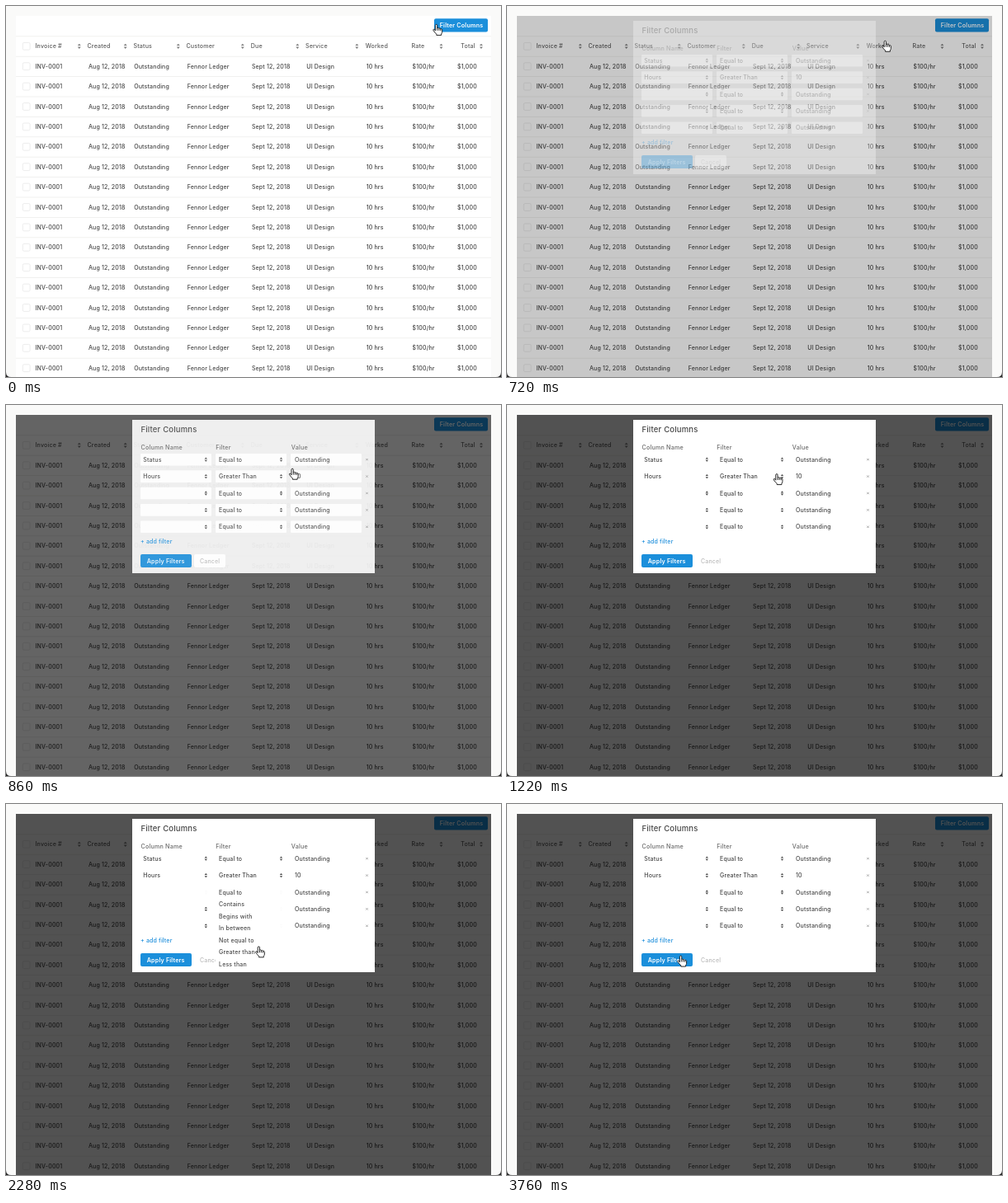
Write an HTML page that moves like this. It is 600 by 450 pixels and loops after 4.14 s.

```html
<!DOCTYPE html>
<html lang="en">
<head>
<meta charset="utf-8">
<title>Filter columns</title>
<style>
  html, body { margin: 0; width: 100%; height: 100%; overflow: hidden; background: #222; }
  svg { display: block; width: 100vw; height: 100vh; }
  text { font: 500 7px Inter, "Open Sans", sans-serif; letter-spacing: .17px; fill: #444; white-space: pre; }
  .head { font-size: 7.1px; fill: #5c5c5c; }
  .title { font-size: 9.5px; }
  .label { font-size: 7.2px; fill: #6a6a6a; }
  .button { font-size: 7.2px; font-weight: 600; fill: #fff; }
  .link { fill: #1b8ddb; }
  .muted { fill: #b9b9b9; }
</style>
</head>
<body>
<svg id="stage" viewBox="0 0 600 450"></svg>
<script>
const LOOP = 4140;
const BLUE = '#1b8fdb';
const stage = document.getElementById('stage');

function add(parent, tag, attrs = {}, content = '') {
  const node = document.createElementNS('http://www.w3.org/2000/svg', tag);
  for (const key in attrs) node.setAttribute(key, attrs[key]);
  node.textContent = content;
  parent.appendChild(node);
  return node;
}
const box = (parent, x, y, width, height, fill, extra = {}) =>
  add(parent, 'rect', { x, y, width, height, fill, ...extra });
// y is the vertical middle of the line
const label = (parent, x, y, content, cls = '') =>
  add(parent, 'text', { x, y: y + (cls === 'title' ? 3.4 : 2.6), class: cls }, content);
const arrows = (parent, x, y, fill, size = 1) =>
  add(parent, 'path', {
    d: 'M-2-.7L0-3.1 2-.7zM-2 .7L0 3.1 2 .7z', fill,
    transform: `translate(${x} ${y}) scale(${size})`
  });

// Table
const columns = [
  // title, title x, cell, cell x, sort arrow x
  ['Invoice #', 35.5, 'INV-0001', 35.5, 88.8],
  ['Created', 98.5, 'Aug 12, 2018', 99.9, 144.7],
  ['Status', 154.5, 'Outstanding', 155.2, 208.8],
  ['Customer', 218.5, 'Fennor Ledger', 219.7, 286.8],
  ['Due', 296.7, 'Sept 12, 2018', 297.9, 353.3],
  ['Service', 363, 'UI Design', 364.3, 425.3],
  ['Worked', 435.7, '10 hrs', 436.7],
  ['Rate', 491.5, '$100/hr', 492.5, 527.5],
  ['Total', 551.3, '$1,000', 547, 576]
];

function drawTable() {
  add(stage, 'path', { d: 'M0 0H600V444Q600 450 594 450H6Q0 450 0 444z', fill: '#fafaf9' });
  box(stage, 12, 12, 576, 438, '#fff');
  box(stage, 519, 15.2, 65, 16.2, BLUE, { rx: 2 });
  label(stage, 525.7, 23.4, 'Filter Columns', 'button');
  for (let row = 0; row <= 16; row++) {
    const y = 48.8 + row * 24.4;
    box(stage, 12, y - 12.4, 576, .8, '#ededec');
    box(stage, 20.3, y - 4.4, 8.8, 8.8, '#fff', { rx: 1.5, stroke: '#e8e8e7', 'stroke-width': .8 });
    for (const [title, titleX, cell, cellX, sortX] of columns) {
      if (row) {
        label(stage, cellX, y, cell);
        continue;
      }
      label(stage, titleX, y, title, 'head');
      if (sortX) arrows(stage, sortX, y, '#808080');
    }
  }
}

// Filter dialog
const filters = [
  ['Status', 'Equal to', 'Outstanding'],
  ['Hours', 'Greater Than', '10'],
  ['', 'Equal to', 'Outstanding'],
  ['', 'Equal to', 'Outstanding'],
  ['', 'Equal to', 'Outstanding']
];
const options = ['Equal to', 'Contains', 'Begins with', 'In between', 'Not equal to', 'Greater than', 'Less than'];
let coveredArrow;

function drawDialog(dialog) {
  box(dialog, 153, 18, 294, 186, '#fff');
  label(dialog, 163.5, 29.3, 'Filter Columns', 'title');
  label(dialog, 163.5, 51, 'Column Name', 'label');
  label(dialog, 254.3, 51, 'Filter', 'label');
  label(dialog, 345.8, 51, 'Value', 'label');
  filters.forEach(([column, test, value], i) => {
    const y = 66.2 + i * 20.4;
    for (const x of [163, 254, 345]) box(dialog, x, y - 7.3, 86, 14.6, '#fff', { rx: 1 });
    label(dialog, 166.3, y, column);
    label(dialog, 258, y, test);
    label(dialog, 350, y, value);
    const arrow = arrows(dialog, 242.3, y, '#444', .85);
    if (i === 2) coveredArrow = arrow;
    arrows(dialog, 333.5, y, '#444', .85);
    add(dialog, 'path', {
      d: `M436.3 ${y - 1.2}l2.4 2.4m0-2.4l-2.4 2.4`, stroke: '#888', 'stroke-width': .7
    });
  });
  label(dialog, 163, 165.6, '+ add filter', 'link');
  box(dialog, 163, 181, 62, 16, BLUE, { rx: 2 });
  label(dialog, 170.7, 189, 'Apply Filters', 'button');
  box(dialog, 228, 181, 38, 16, '#fff', { rx: 2 });
  label(dialog, 235, 189, 'Cancel', 'muted');
}

function drawMenu(menu) {
  box(menu, 254, 99, 86, 105, '#fff');
  options.forEach((option, i) => label(menu, 258, 107.4 + i * 14.45, option));
}

function drawCursor() {
  return add(stage, 'path', {
    d: 'M-2.6 1.2V-5.2Q-2.5-6.4-1.4-6.4T-.3-5.2V-1.8Q.3-2.5 1-2.3T1.8-1.5Q2.4-2 3.1-1.7T3.8-.9Q4.6-1.3 5.2-.8T5.6.5V2.8Q5.6 4 4.6 5.2V6.6H-1.2V5.4Q-3.2 3.4-5 .9Q-5.4-.2-4.6-.6T-2.6 1.2zM-.3-1.8V1M1.8-1.4V1M3.8-.8V1.2',
    fill: '#fff', stroke: '#111', 'stroke-width': .9, 'stroke-linejoin': 'round'
  });
}

drawTable();
const shade = box(stage, 12, 12, 576, 438, '#000');
const dialog = add(stage, 'g');
drawDialog(dialog);
const menu = add(stage, 'g');
drawMenu(menu);
const cursor = drawCursor();

// Critically damped spring from 0 to 1
function spring(time, start, rate) {
  const p = Math.max(0, time - start) * rate;
  return 1 - (1 + p) * Math.exp(-p);
}

const stops = [[523, 28.8], [328.3, 90], [307.3, 181.3], [212, 190.5]];
// Layers fade one by one, so stacked fills show through each other
const fade = (group, opacity) => {
  for (const layer of group.children) layer.setAttribute('opacity', opacity);
};

function render(time) {
  const moves = [spring(time, 660, .0191), spring(time, 1900, .015), spring(time, 2980, .015)];
  const menuOpacity = moves[1] * (1 - moves[2]);
  shade.setAttribute('opacity', .68 * moves[0]);
  fade(dialog, moves[0]);
  fade(menu, menuOpacity);
  coveredArrow.setAttribute('opacity', moves[0] * (1 - menuOpacity));
  const [x, y] = [0, 1].map(axis => moves.reduce(
    (sum, move, i) => sum + move * (stops[i + 1][axis] - stops[i][axis]), stops[0][axis]));
  cursor.setAttribute('transform', `translate(${x} ${y})`);
}

const begin = performance.now();
function tick() {
  render((performance.now() - begin) % LOOP);
  requestAnimationFrame(tick);
}
tick();
</script>
</body>
</html>
```
